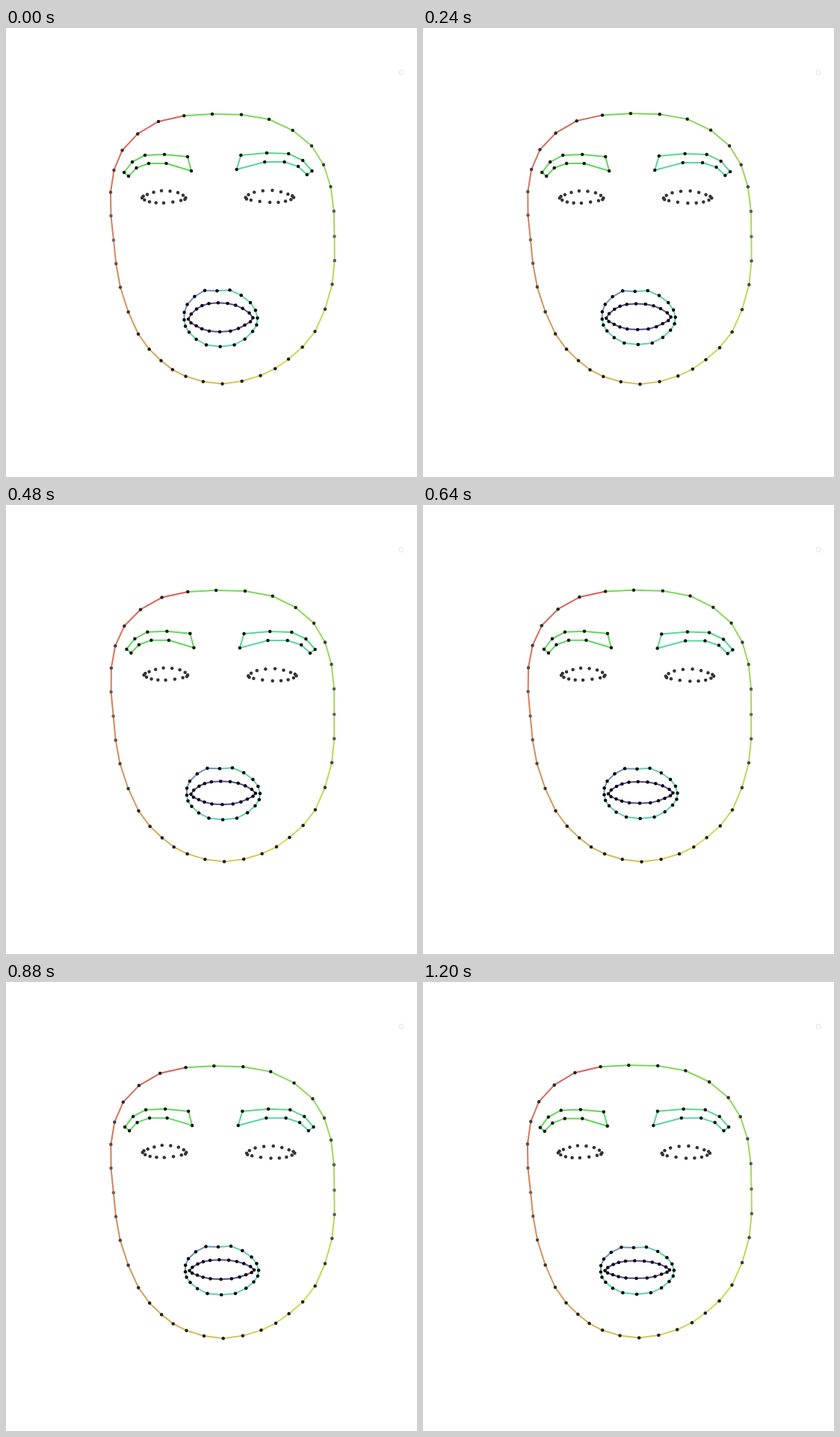
These frames come from a looping animation (550 px wide and 600 px high, 1.28 s). An HTML page with a canvas:

```html
<!DOCTYPE html>
<html lang="en">
<head>
<meta charset="utf-8">
<title>Face landmarks</title>
<style>
html, body { margin: 0; width: 100%; height: 100%; overflow: hidden; background: #fff; }
canvas { display: block; }
</style>
</head>
<body>
<canvas id="stage" width="550" height="600"></canvas>
<script>
const ctx = document.getElementById('stage').getContext('2d');
const LOOP = 1280, STEP = 80, LAST = 1200, PEAK = 640, MOUTH_Y = 388;

// Point u (0..1) of a smooth closed curve through the key points.
function curve(keys, u) {
  const n = keys.length, k = Math.floor(u * n), t = u * n - k;
  const [a, b, c, d] = [-1, 0, 1, 2].map(o => keys[(k + o + n) % n]);
  return [0, 1].map(j => b[j] + t / 2 * (c[j] - a[j] +
    t * (2 * a[j] - 5 * b[j] + 4 * c[j] - d[j] + t * (3 * (b[j] - c[j]) + d[j] - a[j]))));
}

const outline = (keys, n) => Array.from({ length: n }, (_, i) => curve(keys, i / n));

// The right-hand features are wider mirror images of the left ones.
const mirror = (pts, from, to, scale, dy) =>
  pts.map(([x, y]) => [to - (x - from) * scale, y + dy]);

const face = outline([
  [276, 115], [352, 122], [409, 157.5], [434.5, 212], [439.5, 278.5], [436.5, 342.5],
  [413.5, 405.5], [378, 442.5], [340.5, 464.5], [289.5, 475.5], [240.5, 465.5], [207.5, 444.5],
  [177, 409], [153, 346.5], [144, 283.5], [140, 219.5], [155.5, 163.5], [204, 125]
], 36);

const brow = [
  [158, 193], [169, 179], [186, 170], [212, 169], [243, 172],
  [248, 191], [214.5, 181], [191, 181], [174.5, 187], [164, 198]
];

const eye = outline([
  [182, 227], [189, 222.5], [208, 217.5], [230, 220],
  [240.5, 227], [234, 230.5], [211, 233.7], [192, 232.2]
], 16);

// The upper lip dips at its middle point.
const lips = outline([
  [238.5, 390], [242.5, 369.5], [266, 350.5], [299.5, 350], [327, 367],
  [336.5, 387.5], [330, 405.5], [305.5, 423.5], [268, 423.5], [245, 406.5]
], 20).map(([x, y], i) => [x, y + 3.3 * Math.exp(-3 * (i - 5) ** 2)]);

const gap = outline([
  [244, 389], [255, 375.5], [271.5, 368.3], [296.5, 368], [316.7, 374.7],
  [330.5, 387.3], [319.5, 397], [300.3, 405], [272, 405], [254.5, 398]
], 20);

const hsl = (h, s = 62, l = 60) => `hsl(${h} ${s}% ${l}%)`;

// sway and nod: how far a part follows each head movement; squeeze: how much it closes.
const parts = [
  {
    pts: face,
    sway: (u, v) => [5 * v * v - 1.5 * v - 0.5, 1.2 + 1.2 * u],
    nod: (u, v) => [0, -1.7 + 1.9 * v + 0.5 * u],
    color: i => hsl(4 + 104 * ((70 - i) % 36 / 35) ** 1.1),
    shade: y => 30 + 78 * Math.max(0, 1 - Math.abs(y - 275) / 150)
  },
  {
    pts: brow, shade: () => 20,
    sway: () => [4.4, -1.1], nod: () => [-0.7, 1.3],
    color: () => hsl(117)
  },
  {
    pts: mirror(brow, 158, 409.5, 1.12, -2), shade: () => 20,
    sway: () => [4.8, 0.6], nod: () => [0.2, 2.9],
    color: i => hsl(i < 5 ? 142 : 153)
  },
  {
    pts: eye, shade: () => 52,
    sway: () => [3.5, -0.4], nod: () => [-0.7, 1.2]
  },
  {
    pts: mirror(eye, 182, 385, 1.1, -0.6), shade: () => 52,
    sway: () => [4.5, 0.8], nod: () => [-0.5, 2.4]
  },
  {
    pts: lips, shade: () => 6, squeeze: 0.165,
    sway: () => [4.1, -1], nod: () => [-0.1, -2.4],
    color: i => i < 5 ? hsl(215, 36) : hsl(i < 10 ? 156 : 165, 55)
  },
  {
    pts: gap, shade: () => 6, squeeze: 0.39,
    sway: () => [4, -0.8], nod: () => [0, -3],
    color: () => hsl(256, 36, 44)
  }
];

const easeOut = x => 1 - (1 - x) ** 1.4;
const easeInOut = x => (1 - Math.cos(Math.PI * x)) / 2;

function swayAt(time) {
  return time < PEAK
    ? easeInOut(time / PEAK)
    : 1 - 1.12 * easeOut((time - PEAK) / (LAST - PEAK));
}

function pose({ pts, sway, nod, squeeze = 0 }, time) {
  const s = swayAt(time), c = easeOut(time / LAST);
  return pts.map(([x, y]) => {
    const u = (x - 290) / 150, v = (y - 295) / 180;
    const [sx, sy] = sway(u, v), [nx, ny] = nod(u, v);
    return [
      x + s * sx + c * nx,
      y + s * sy + c * (ny - squeeze * (y - MOUTH_Y))
    ];
  });
}

function drawPart(part, time) {
  const pts = pose(part, time);
  if (part.color) pts.forEach((a, i) => {
    ctx.strokeStyle = part.color(i);
    ctx.beginPath();
    ctx.moveTo(...a);
    ctx.lineTo(...pts[(i + 1) % pts.length]);
    ctx.stroke();
  });
  for (const [x, y] of pts) {
    const g = part.shade(y);
    ctx.fillStyle = `rgb(${g} ${g} ${g})`;
    ctx.beginPath();
    ctx.arc(x, y, 2.25, 0, 7);
    ctx.fill();
  }
}

function draw() {
  const time = Math.floor(performance.now() % LOOP / STEP) * STEP;
  ctx.clearRect(0, 0, 550, 600);
  ctx.lineWidth = 2;
  ctx.lineCap = 'round';
  for (const part of parts) drawPart(part, time);
  ctx.lineWidth = 1;
  ctx.strokeStyle = '#e2e2e2';
  ctx.beginPath();
  ctx.roundRect(526.5, 56.5, 5, 6, 1);
  ctx.stroke();
  requestAnimationFrame(draw);
}
draw();
</script>
</body>
</html>
```
